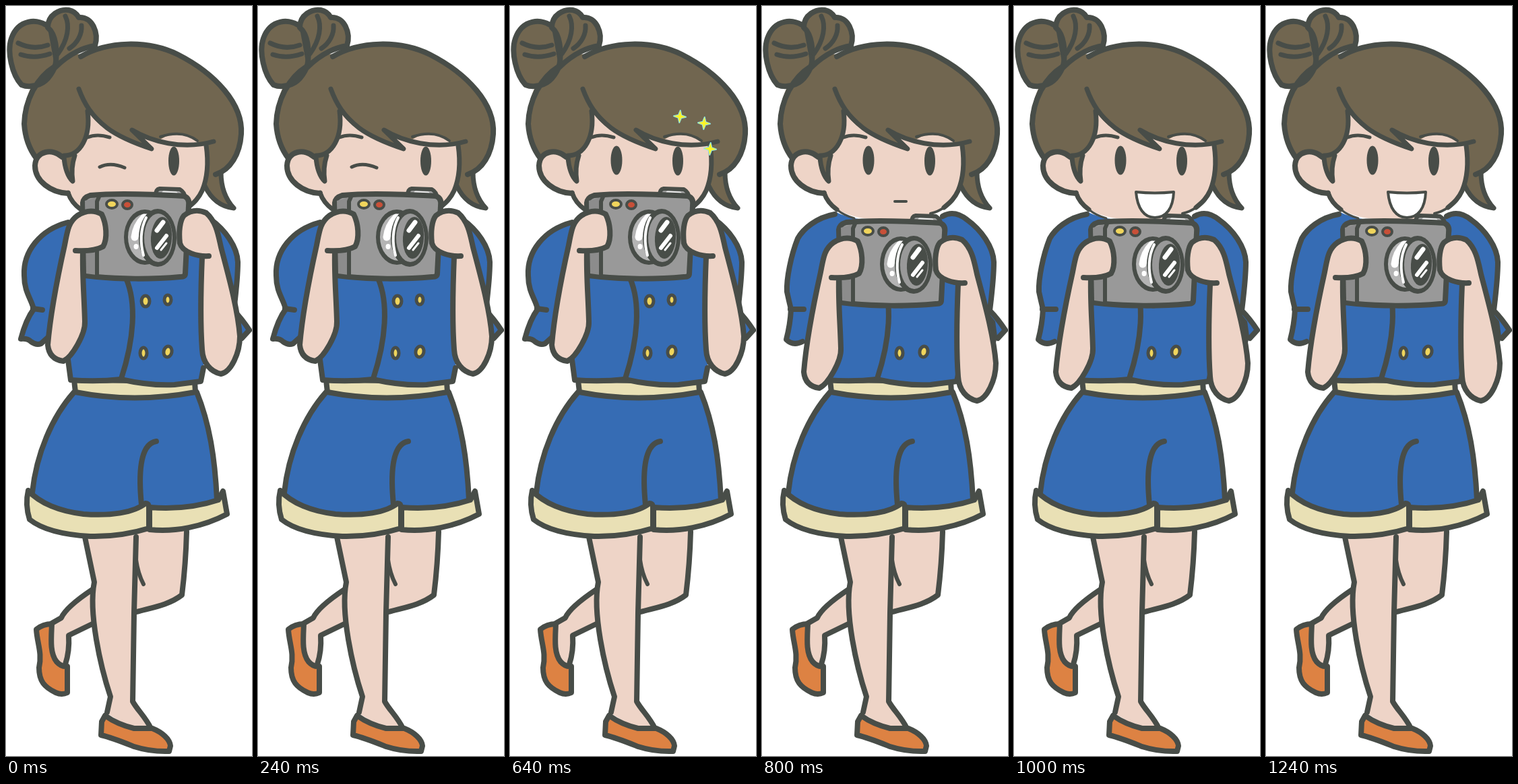
An HTML page with a canvas that plays this animation: 365 by 1113 pixels, repeating every 1400 ms.

```html
<!DOCTYPE html>
<html lang="en">
<head>
<meta charset="utf-8">
<title>Girl with a camera</title>
<style>
html, body { margin: 0; width: 100%; height: 100%; overflow: hidden; background: #fff; }
canvas { display: block; width: 365px; height: 1113px; }
</style>
</head>
<body>
<canvas id="stage" width="365" height="1113"></canvas>
<script>
const ctx = document.getElementById('stage').getContext('2d');
const INK = '#484d48', HAIR = '#716650', SKIN = '#eed4c7', BLUE = '#366cb4',
      CREAM = '#e9e0b5', ORANGE = '#dd8243', GREY = '#999', YELLOW = '#f0d55c';
const LOOP = 1400, DROP = 40;

ctx.lineCap = ctx.lineJoin = 'round';

function fill(d, color) {
  ctx.fillStyle = color;
  ctx.fill(new Path2D(d));
}

function line(d, width = 8, color = INK) {
  ctx.lineWidth = width;
  ctx.strokeStyle = color;
  ctx.stroke(new Path2D(d));
}

function shape(d, color, width = 8) {
  fill(d, color);
  line(d, width);
}

function oval(x, y, rx, ry, color, width = 0, tilt = 0) {
  ctx.beginPath();
  ctx.ellipse(x, y, rx, ry, tilt, 0, Math.PI * 2);
  ctx.fillStyle = color;
  ctx.fill();
  if (width) {
    ctx.lineWidth = width;
    ctx.strokeStyle = INK;
    ctx.stroke();
  }
}

function legs() {
  // bent leg
  fill('M194 770H268C267 820 264 850 261 874C242 889 215 893 194 899L130 917L93 934C94 950 92 965 88 980C70 972 66 945 68 916L82 908Q92 891 128 866Z', SKIN);
  line('M268 780C267 820 264 850 261 874C242 889 215 893 194 899');
  line('M128 866Q89 892 82 908L68 916');
  line('M128 917L93 934C94 950 92 965 88 977');
  shape('M45 925Q55 917 68 917C67 940 65 960 75 973Q82 981 91 980L91 1019Q83 1023 74 1019C57 1011 49 1002 49 982C54 960 46 945 45 925Z', ORANGE);
  // standing leg
  fill('M117 780L131 855C122 900 140 980 155 1025L150 1050L190 1074L215 1072C205 1055 195 1045 188 1032L190 900L193 780Z', SKIN);
  line('M117 788L131 855C122 900 140 980 155 1025L150 1048');
  line('M193 788L190 900L188 1032C195 1045 207 1055 215 1072');
  line('M193 822Q196 843 204 858', 6);
  shape('M147 1053Q165 1066 190 1072L217 1072C232 1078 243 1088 244 1098L242 1106Q215 1107 190 1099C175 1093 158 1086 141 1082L142 1062Z', ORANGE);
}

function shorts() {
  fill('M103 573Q190 590 283 573C302 620 310 670 313 725V737Q265 748 213 743L207 738C195 755 150 757 115 755C85 752 55 742 38 722C42 660 70 605 103 573Z', BLUE);
  line('M101 573C68 610 45 665 39 722');
  line('M283 573C302 620 310 670 313 733');
  line('M201 740C197 700 197 650 223 646');
  shape('M33 719C50 738 80 750 115 754C155 757 190 752 207 738Q212 738 212 745V775Q170 788 125 787C90 785 55 778 35 762Q28 740 33 719Z', CREAM);
  shape('M213 744C250 747 285 743 315 733L322 720L328 754C292 773 250 781 213 777Z', CREAM);
  shape('M101 555L103 573Q190 590 281 573L280 557Z', CREAM);
}

function sleeves(low) {
  const side = 'C325 332 343 357 344 380C344 405 340 435 338 452Q350 464 361 481L350 493';
  if (low) {
    const left = 'M108 309C80 314 61 331 53 345C43 370 36 405 37 424Q40 438 43 450Q42 472 36 495Q46 505 60 498';
    const right = 'M268 312Q285 302 304 317' + side;
    fill(left + 'L112 520H292L350 493L361 481Q350 464 338 452C340 435 344 405 344 380C343 357 325 332 304 317Q285 302 268 312L250 317H150Q125 314 108 305Z', BLUE);
    line(left);
    line(right);
    line('M42 450L62 450');
    fill('M338 458L346 468L349 490L344 514L336 510Z', INK);
  } else {
    const left = 'M92 321C50 332 25 365 27 400C27 425 38 435 41 450C32 462 27 475 22 494Q32 493 37 498Q45 504 52 501L62 492';
    const right = 'M304 317' + side;
    fill(left + 'L100 460Z', BLUE);
    fill(right + 'L300 460Z', BLUE);
    line(left);
    line(right);
    line('M40 449L54 451');
  }
}

function shirt() {
  fill('M110 365L105 480L92 525L96 555Q135 558 170 554Q215 564 250 562L289 557L293 535V365Z', BLUE);
  line('M92 525L96 555Q135 558 170 554Q215 564 250 562L289 557L293 537');
  line('M178 404C194 440 190 495 171 553');
  oval(207, 438, 6, 8, YELLOW, 5);
  oval(240, 436, 5, 7, YELLOW, 5);
  oval(204, 515, 5, 8, YELLOW, 5);
  oval(240, 513, 6, 8, YELLOW, 5, .2);
}

function bun() {
  shape('M66 33C47 16 18 20 8 48C1 68 9 102 23 117Q35 122 50 116C63 111 72 95 75 82Z', HAIR);
  shape('M62 32C62 13 80 4 93 6Q103 8 108 17C128 15 138 40 132 59C116 62 97 68 73 91C77 66 74 42 62 32Z', HAIR);
  line('M88 15C95 29 92 50 77 71', 7);
  line('M112 29C113 42 106 55 94 63', 7);
  line('M18 55Q40 66 62 58', 7);
  line('M22 72Q42 79 65 71', 7);
}

function head() {
  fill('M47 225C28 205 22 160 30 140C38 110 55 95 72 88L95 70L112 72C150 52 210 50 255 72C310 100 352 145 349 190C347 220 333 243 311 250L319 247C319 268 325 286 338 300C320 298 305 288 295 267L100 260Z', HAIR);
  bun();
  fill('M122 156C130 172 153 187 175 198L216 212L201 194L229 198Q260 179 286 203L297 207C301 235 298 255 291 275C285 297 255 317 205 317C150 318 108 314 92 277C60 280 42 260 43 237C45 214 72 212 85 224Q88 250 99 260Q96 240 102 220Q124 200 122 156Z', SKIN);
  // hair outline
  line('M72 90C45 107 28 140 27 175Q29 205 45 226');
  line('M111 75C150 52 210 50 255 72C310 100 352 145 349 190C347 220 333 243 311 250');
  line('M319 247C319 268 325 286 338 300C320 298 305 288 295 267', 7);
  line('M108 123C116 145 127 163 150 181C170 196 195 205 216 212L187 184C215 201 262 214 308 201', 7);
  line('M121 156C126 195 110 222 86 222', 7);
  line('M121 195Q135 189 154 195', 5);
  line('M229 194Q262 183 284 200', 4);
  line('M86 224C87 240 92 254 99 260Q96 240 102 222', 7);
  // ear, cheeks and chin
  line('M83 224C70 211 44 214 43 237C43 260 67 277 92 278');
  line('M297 207C301 235 299 255 291 274C286 285 280 291 270 299', 7);
  line('M92 277Q97 292 111 302', 7);
  line('M111 302Q122 311 137 315', 3);
  line('M270 299Q262 305 250 308', 4);
}

function eyes(wink) {
  oval(249, 230, 8, 21.5, INK);
  if (wink) line('M139 239Q155 231 176 240', 5);
  else oval(158, 229, 8.5, 21.5, INK);
}

function camera() {
  shape('M222 281Q222 272 228 271L258 272Q265 276 266 285Z', '#a5a5a5', 6);
  line('M234 277L252 278', 5, '#eee');
  shape('M114 292Q115 284 125 281C165 277 230 280 264 282Q273 285 271 297L266 397Q266 402 258 402C215 406 165 405 135 402L117 400Z', GREY);
  fill('M117 289L135 284L134 399L119 397Z', '#8c8c8c');
  line('M139 281L135 290V402', 6);
  oval(157, 294, 8, 6, YELLOW, 4);
  oval(180, 295, 7, 6, '#c85038', 4);
  // lens, back to front
  oval(206, 343, 31, 41, INK);
  oval(208, 343, 27, 35, '#b4b4b4');
  line('M205 314Q193 326 191 343', 11, '#fff');
  oval(193, 357, 3.5, 4, '#fff');
  oval(225, 344, 28, 43, INK);
  line('M208 314C199 331 199 352 204 370', 4, '#fff');
  oval(226, 344, 21, 36, GREY);
  oval(230.5, 344, 15.5, 31, INK, 0, .06);
  line('M224 333L233 321', 7, '#fff');
  line('M224 359L238 341', 6, '#fff');
  line('M230 362L238 352', 3, '#fff');
}

function arms() {
  const left = 'M103 363C120 364 135 362 144 357C151 345 149 323 142 309Q125 299 106 311C92 321 91 335 87 355C77 400 66 455 62 503Q64 524 85 527C98 521 118 487 117 468C116 430 113 400 114 364';
  const right = 'M301 371C285 372 262 366 258 352C256 335 258 318 264 311Q279 299 297 307C312 320 315 340 319 358C330 400 344 450 347 490C347 515 334 543 319 546C304 543 292 530 291 510C288 470 289 420 291 372';
  for (const arm of [left, right]) {
    fill(arm, SKIN);
    line(arm);
  }
}

function sparkle(x, y) {
  ctx.beginPath();
  for (let i = 0; i < 8; i++) {
    const r = i % 2 ? 3 : 9, a = i * Math.PI / 4 + .08;
    ctx.lineTo(x + r * Math.cos(a), y + r * Math.sin(a));
  }
  ctx.closePath();
  ctx.lineWidth = 2;
  ctx.strokeStyle = '#8ce4ea';
  ctx.stroke();
  ctx.fillStyle = '#fbf42a';
  ctx.fill();
}

function mouth(t) {
  if (t < 900) line('M197 290H214', 4);
  else if (t < 1000) oval(208, 293, 14, 9, '#fff', 4);
  else shape('M181 276Q209 279 237 276C236 300 226 314 209 314C193 314 183 300 181 276Z', '#fff', 4);
}

function draw(t) {
  const low = t >= 800;
  ctx.fillStyle = '#fff';
  ctx.fillRect(0, 0, 365, 1113);
  sleeves(low);
  legs();
  shorts();
  shirt();
  head();
  eyes(t < 400);
  ctx.save();
  if (low) ctx.translate(0, DROP);
  camera();
  arms();
  ctx.restore();
  if (low) mouth(t);
  else if (t >= 400) {
    sparkle(252, 164);
    sparkle(288, 174);
    sparkle(297, 212);
  }
}

let start;
function tick(now) {
  start ??= now;
  draw((now - start) % LOOP);
  requestAnimationFrame(tick);
}
draw(0);
requestAnimationFrame(tick);
</script>
</body>
</html>
```
